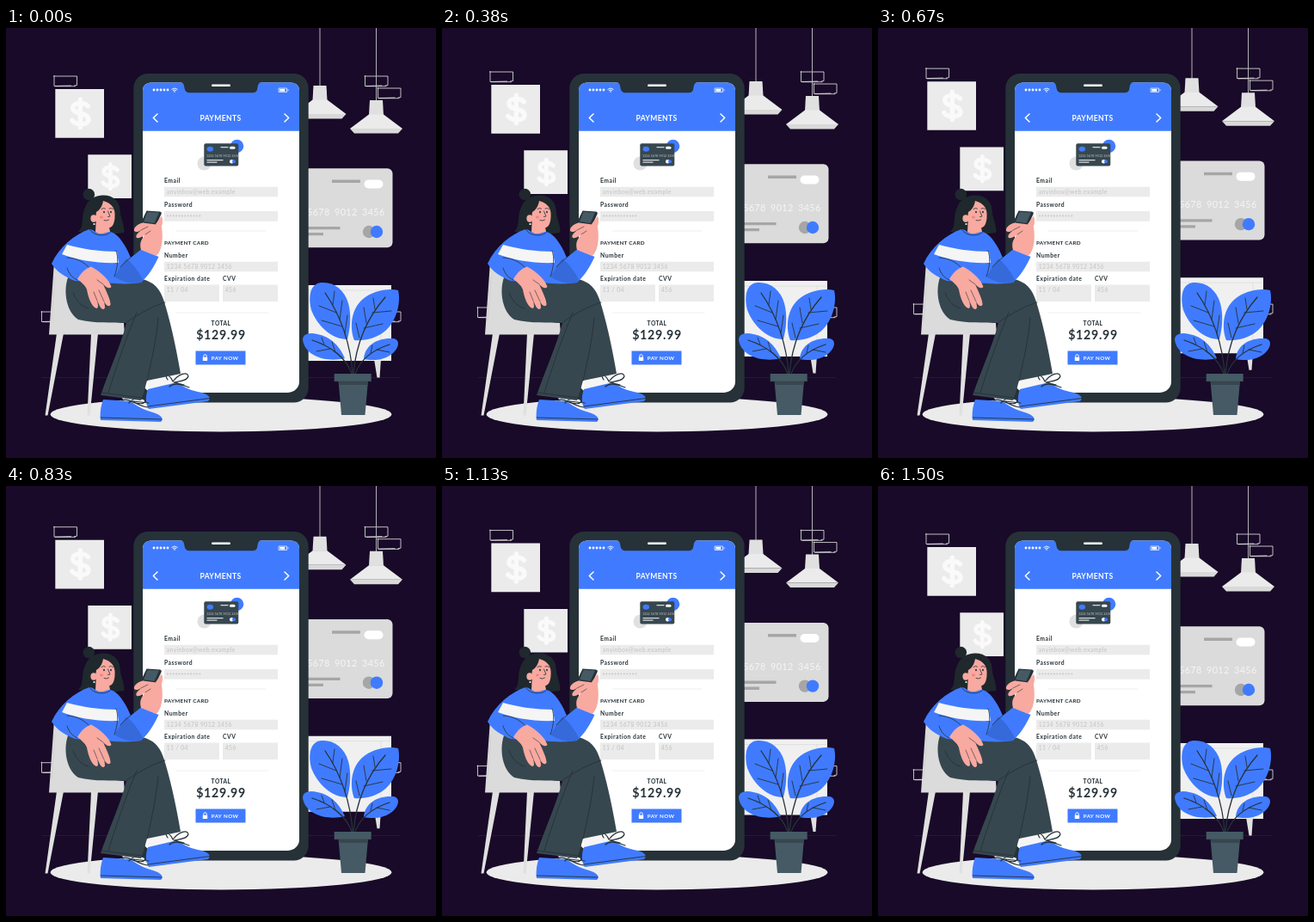
An HTML page with a canvas for the animation above (1540 ms loop, 500 px wide and 500 px high).

```html
<!DOCTYPE html>
<html lang="en">
<head>
<meta charset="utf-8">
<title>Mobile payment</title>
<style>
html, body { margin: 0; width: 100%; height: 100%; overflow: hidden; background: #180a28; }
canvas { display: block; width: 500px; height: 500px; }
</style>
</head>
<body>
<canvas id="stage" width="500" height="500"></canvas>
<script>
const ctx = document.getElementById('stage').getContext('2d');
const LOOP = 1540, PERIOD = 1500, STEP = 1000 / 24, LAST_STEP = 36, RISE = 10;
const BLUE = '#407bff', DARK = '#263238', SLATE = '#37474f', STEEL = '#455a64';
const PALE = '#ebebeb', SKIN = '#f8a9a0', HAIR = '#1f282d', WHITE = '#fff';

function fill(color, path) {
  ctx.fillStyle = color;
  ctx.fill(new Path2D(path));
}

function line(color, width, path) {
  ctx.strokeStyle = color;
  ctx.lineWidth = width;
  ctx.stroke(new Path2D(path));
}

function box(color, x, y, w, h, r = 0) {
  ctx.fillStyle = color;
  ctx.beginPath();
  ctx.roundRect(x, y, w, h, r);
  ctx.fill();
}

function oval(color, x, y, rx, ry = rx) {
  ctx.fillStyle = color;
  ctx.beginPath();
  ctx.ellipse(x, y, rx, ry, 0, 0, Math.PI * 2);
  ctx.fill();
}

function text(str, x, y, size, color, { weight = 700, align = 'left', gap = 0.3 } = {}) {
  ctx.font = `${weight} ${size}px Lato, sans-serif`;
  ctx.letterSpacing = gap + 'px';
  ctx.textAlign = align;
  ctx.fillStyle = color;
  ctx.fillText(str, x, y);
}

function at(x, y, scale, draw) {
  ctx.save();
  ctx.translate(x, y);
  ctx.scale(scale, scale);
  draw();
  ctx.restore();
}

// --- floating background ---

function brick(x, y) {
  at(x, y, 1, () => {
    line(PALE, 0.8, 'M0 .5H27V11L24 11.5M.5 0V12L20 11.5M2 12.2H25');
  });
}

function dollarNote(x, y, size) {
  box(PALE, x, y, size, size);
  at(x + size / 2 + 0.7, y + size / 2, size / 56.5, () => {
    line('#fafafa', 5.4,
      'M9 -8.5C5 -13 -8.5 -13.5 -8.5 -6.5C-8.5 2 9.5 -2 9.5 7C9.5 14 -5 14 -9.5 8M0 -16V16');
  });
}

function lamp(x, y) {
  at(x, y, 1, () => {
    line('#b5b3b8', 1, 'M0 -110V1');
    fill('#e0e0e0', 'M-7.5 0H7.5L8.5 17H-8.5Z');
    fill(PALE, 'M-8.5 16.5H8.5L30.5 33H-30.5Z');
    fill('#d9d9d9', 'M-30.5 33H30.5L25.5 38.5H-25.5Z');
  });
}

function wallCard() {
  box('#dbdbdb', 300, 163.3, 149.5, 92, 6);
  box('#a6a6a6', 379, 176.5, 33, 3.5);
  box(WHITE, 416.5, 176.5, 22, 10, 5);
  ['5678', '9012', '3456'].forEach((group, i) =>
    text(group, 350 + i * 32, 218, 10.8, '#f5f5f5', { weight: 400, gap: 0.4 }));
  box('#a6a6a6', 330, 231, 58.5, 3.3);
  box('#a6a6a6', 330, 238, 39, 3.3);
  oval('#a6a6a6', 422, 237, 7.2);
  oval(BLUE, 431, 237, 7.2);
}

function cabinet() {
  fill('#e0e0e0', 'M428 385H436L434.5 406.5H431.5Z');
  box('#f0f0f0', 330, 299, 118, 88);
  line('#dbdbdb', 0.8, 'M330 305H447M436 305V387');
}

function background() {
  brick(55.5, 55.5);
  brick(417, 55.5);
  brick(432, 69.5);
  brick(41, 329.5);
  brick(432, 329.5);
  dollarNote(57.3, 71, 56.7);
  dollarNote(95.3, 147.3, 50.7);
  lamp(365, 67);
  lamp(430.5, 84);
  wallCard();
  cabinet();
}

// --- phone ---

function field(x, y, w, h, value) {
  box(PALE, x, y, w, h);
  text(value, x + 2.7, y + 8.5, 6.8, '#c2c2c2', { weight: 400, gap: 0.42 });
}

function miniCard() {
  oval('#e0e0e0', 230.5, 157.5, 8);
  oval(BLUE, 268.6, 137.4, 7.7);
  box(SLATE, 230.3, 134.2, 40, 26.3, 2);
  oval(BLUE, 237.3, 140.8, 3.8, 3);
  box(WHITE, 249.5, 138.2, 9, 1);
  box(WHITE, 260, 137.8, 6.5, 3, 1.5);
  text('1234 5678 9012 3456', 233, 150.3, 3.6, '#c7c7c7', { weight: 400, gap: 0.1 });
  box(WHITE, 233.5, 153.2, 19, 1);
  box(WHITE, 233.5, 155.6, 12, 1);
  oval(WHITE, 262.3, 155.2, 2.3);
  oval(BLUE, 265, 155.2, 2);
}

function statusBar() {
  for (let i = 0; i < 5; i++) oval(WHITE, 172 + i * 4, 72, 1.4);
  line(WHITE, 0.9, 'M192.8 71.2Q196 68.5 199.2 71.2M194.2 72.6Q196 71 197.8 72.6');
  oval(WHITE, 196, 74, 0.8);
  line(WHITE, 0.7, 'M317.5 70H326.5V74.5H317.5ZM328 71.5V73');
  box(WHITE, 318.3, 70.8, 6, 2.9);
}

function phone() {
  box(DARK, 148.3, 53, 203.4, 382.5, 17);
  box(WHITE, 159, 63.4, 182, 360.5, [9, 9, 13, 13]);
  box(BLUE, 159, 63.4, 182, 56.3, [9, 9, 0, 0]);
  fill(DARK, 'M203 63C207 63.5 207 67 207.7 70.5C208.5 74 210.5 75.3 214 75.3H286' +
    'C290 75.3 291.7 74 292.3 70.5C293 67 293 63.5 297 63Z');
  box(WHITE, 239, 65.5, 22, 2.4, 1.2);
  statusBar();
  line(WHITE, 1.5, 'M176 100L171.3 104.5L176 109M324 100L328.7 104.5L324 109');
  text('PAYMENTS', 249.5, 107.5, 8.6, WHITE, { align: 'center', gap: 0.35 });
  miniCard();

  const label = (str, x, y) => text(str, x, y, 6.8, DARK, { gap: 0.5 });
  label('Email', 184, 180);
  field(184, 184.7, 132, 11.5, 'anyinbox@web.example');
  label('Password', 184, 208);
  field(184, 213, 132, 11.7, '');
  for (let i = 0; i < 12; i++) oval('#c2c2c2', 188 + i * 3.4, 218.4, 0.9);
  line('#e8e8e8', 0.7, 'M198 236H302M198 331H305');
  text('PAYMENT CARD', 184, 252, 6.4, DARK, { gap: 0.2 });
  label('Number', 184, 267);
  field(184, 271.7, 132, 11.5, '1234 5678 9012 3456');
  label('Expiration date', 184, 294);
  label('CVV', 252, 294);
  field(184, 298.6, 64, 19.5, '11 / 04');
  field(252, 298.6, 64, 19.5, '456');
  text('TOTAL', 250, 346, 6.7, DARK, { align: 'center', gap: 0.4 });
  text('$129.99', 250, 362.3, 14.2, DARK, { align: 'center', gap: 0.7 });
  box(BLUE, 220.5, 375.5, 58, 16);
  box(WHITE, 228.8, 382.8, 5.4, 4.2, 0.6);
  line(WHITE, 1, 'M229.8 383V381.4A1.7 1.7 0 0 1 233.2 381.4V383');
  text('PAY NOW', 238.8, 386.3, 6.2, WHITE, { gap: 0.35 });
}

// --- seated woman ---

function chair() {
  fill('#e0e0e0', 'M59 355H67L48.5 450.5H45.5ZM99 355H107L97.5 450.5H94.5Z');
  fill('#dbdbdb', 'M56 272L50 356.5H138L137 343L85 337L77 272Z');
  line('#cfcfcf', 0.7, 'M57 289L53 340');
}

function shoes() {
  fill('#f5f5f5', 'M133 428L161 432L163 443L144 441ZM164 408L200 403L206 417L166 424Z');
  fill(BLUE, 'M113 432C110 440 109 449 110 456L180 458C184 455 181 450 171 447C160 444 151 439 145 434Z');
  fill(BLUE, 'M165 420C162 428 162 437 166 443L235 434C240 429 234 425 223 423C213 421 204 416 199 412Z');
  line(DARK, 0.9, 'M110 453L181 455M165 440L237 430.5');
  line(DARK, 1.2, 'M135 433C143 429 152 440 165 441M143 436C150 428 160 430 162 434C160 439 149 436 148 434L166 436' +
    'M190 417C195 412 203 414 213 418M188 409C183 402 190 402 194 411C201 402 211 399 212 405C210 411 200 411 195 412L207 415');
}

function trousers() {
  fill(SLATE, 'M72 290C66 308 71 331 84 339C104 344 123 342 140 343C133 370 120 398 110 427' +
    'L157 433C160 425 162 417 164 410L203 402C199 378 193 349 186 325C181 306 175 296 158 292L115 285Z');
  line(DARK, 0.9, 'M139 343C151 335 166 325 185 319M152 331C139 362 128 395 119 424' +
    'M164 410C170 384 175 360 177 337M111 424L158 430M78 308C82 318 88 324 96 326');
}

function head() {
  oval(HAIR, 96.3, 193.5, 6.8);
  fill(HAIR, 'M112 194.5C125 194 132 202 132.5 211C133 221 138 229 137.5 238L120 240L84 237' +
    'C91 231 87 222 91 211C94 201 101 195 112 194.5Z');
  fill(SKIN, 'M105 219L104 237C109 243 118 242 121 237L119 226Z');
  fill(SKIN, 'M105 214C109 212 112 207 113 201C121 203 126 208 126.5 215C127 225 125 232 119 232.5' +
    'C112 232.5 107 227 104 222Z');
  oval(SKIN, 102, 221.5, 3.6, 4.2);
  oval(WHITE, 102.5, 228, 1.1);
  line(DARK, 0.8, 'M111 210.5Q113.5 208.5 115.5 210M120 210Q122.5 208.5 124.5 210.5' +
    'M118.5 213L121 219L118.5 219.5M114 223.5Q117 225 119.5 223');
  oval(DARK, 114, 214, 0.9, 1.2);
  oval(DARK, 122, 214, 0.9, 1.2);
  oval('#ef867f', 111, 220, 2, 1.4);
}

function sweater() {
  fill(BLUE, 'M97 234C80 240 62 254 53 274C59 284 70 290 80 294L127 297C140 298 151 297 157 296' +
    'C166 288 173 276 177.5 266L157 257.5L145 267C141 257 134 244 126 239C119 235 119 238 112 239' +
    'C105 240 102 234 97 234Z');
  fill('#3669d9', 'M126 289L140 268C148 275 155 284 159 293L156 296C145 298 135 295 126 289Z');
  fill('#f5f5f5', 'M71 252C88 257 110 260 129 260L131 273C107 274 83 270 65 263Z');
  line(DARK, 0.8, 'M97 234C102 242 115 243 121 238M71 267C81 267 91 272 98 280M128 259C131 267 130 278 126 289' +
    'M145 267C141 270 136 274 133 278M83 293C76 290 73 285 71 279');
}

function hands() {
  fill(SKIN, 'M83 292C87 285 92 280 99 277.5C111 284 120 293 122.5 301C120 304 116 301 113 298' +
    'C117 307 122 317 121.5 322C119 325 116 322 114 318C115 323 116 327 113 327C109 326 108 320 106 317' +
    'C107 322 108 326 105 326C99 324 95 311 94 304C92 299 88 296 83 292Z');
  line(DARK, 0.6, 'M114 318L108 305M106 317L102 307M113 298L106 293');
  fill(SKIN, 'M157 258L175 265C183 257 183 240 180 225C176 221 168 226 161 226C155 227 148 231 149 236' +
    'C151 238 154 237 157 235C153 239 150 241 152 244C156 245 159 242 162 240C157 246 155 250 157 258Z');
  fill(DARK, 'M163.5 212.5L179 213.5Q181.5 214 180.5 216.5L175 228.5L159.5 226.5Q157.5 225.5 158.5 223Z');
  fill(STEEL, 'M164.5 213.7L178 214.5L172.5 227L160 225Z');
  fill(SKIN, 'M174 228L180.5 219Q183 220 181.5 229L176 236Z');
  line(DARK, 0.6, 'M157 235L165 231M162 240L168 236');
}

function woman() {
  chair();
  shoes();
  trousers();
  head();
  sweater();
  hands();
}

// --- plant ---

function plant() {
  fill(BLUE, 'M397 362C378 362 362 346 355 328C351 312 354 299 364 296.5C379 294 393 303 398 320C402 335 400 350 397 362Z');
  fill(BLUE, 'M405 363C400 350 400 329 414 316C425 306 444 302 456 305C460 322 452 344 440 353C430 361 417 364 405 363Z');
  fill(BLUE, 'M394 384C375 389 350 383 345.5 365C343 356 352 353 362 356C379 359 389 372 394 384Z');
  fill(BLUE, 'M416 385C417 370 430 360 450 361C459 362 457 372 450 378C440 387 425 387 416 385Z');
  line(DARK, 1.3, 'M403 402C401 370 390 335 371 308M404 402C407 367 419 338 441 313' +
    'M402 402C396 384 378 370 356 363M406 402C412 386 424 375 446 368');
  line(DARK, 0.9, 'M380 322L382 306M388 339L391 317M394 355L397 334M384 331L364 323M391 347L367 340' +
    'M429 327L427 314M419 343L416 325M411 360L407 343M426 331L448 329M416 349L438 344' +
    'M370 368L367 360M383 377L379 365M377 373L361 376M424 378L426 369M431 374L446 377');
  fill(STEEL, 'M386.5 410H421L417.5 450H390Z');
  fill(SLATE, 'M387 411H421L420.5 415H387.5Z');
  box(STEEL, 381.7, 402, 43, 9);
  line(SLATE, 0.6, 'M382 410.7H424.5');
}

function render(now) {
  const step = Math.min(Math.floor((now % LOOP + 5) / STEP), LAST_STEP);
  const phase = (step + 0.5) * STEP / PERIOD % 1;
  const lift = RISE * (1 - Math.abs(1 - 2 * phase));

  ctx.fillStyle = '#180a28';
  ctx.fillRect(0, 0, 500, 500);
  line(DARK, 0.5, 'M42 406.5H458');
  at(0, 0.3 - lift, 1, background);
  oval(PALE, 250, 449.2, 198.3, 20.2);
  phone();
  woman();
  plant();
}

ctx.lineCap = ctx.lineJoin = 'round';
const start = performance.now();
function tick() {
  render(performance.now() - start);
  requestAnimationFrame(tick);
}
tick();
</script>
</body>
</html>
```
